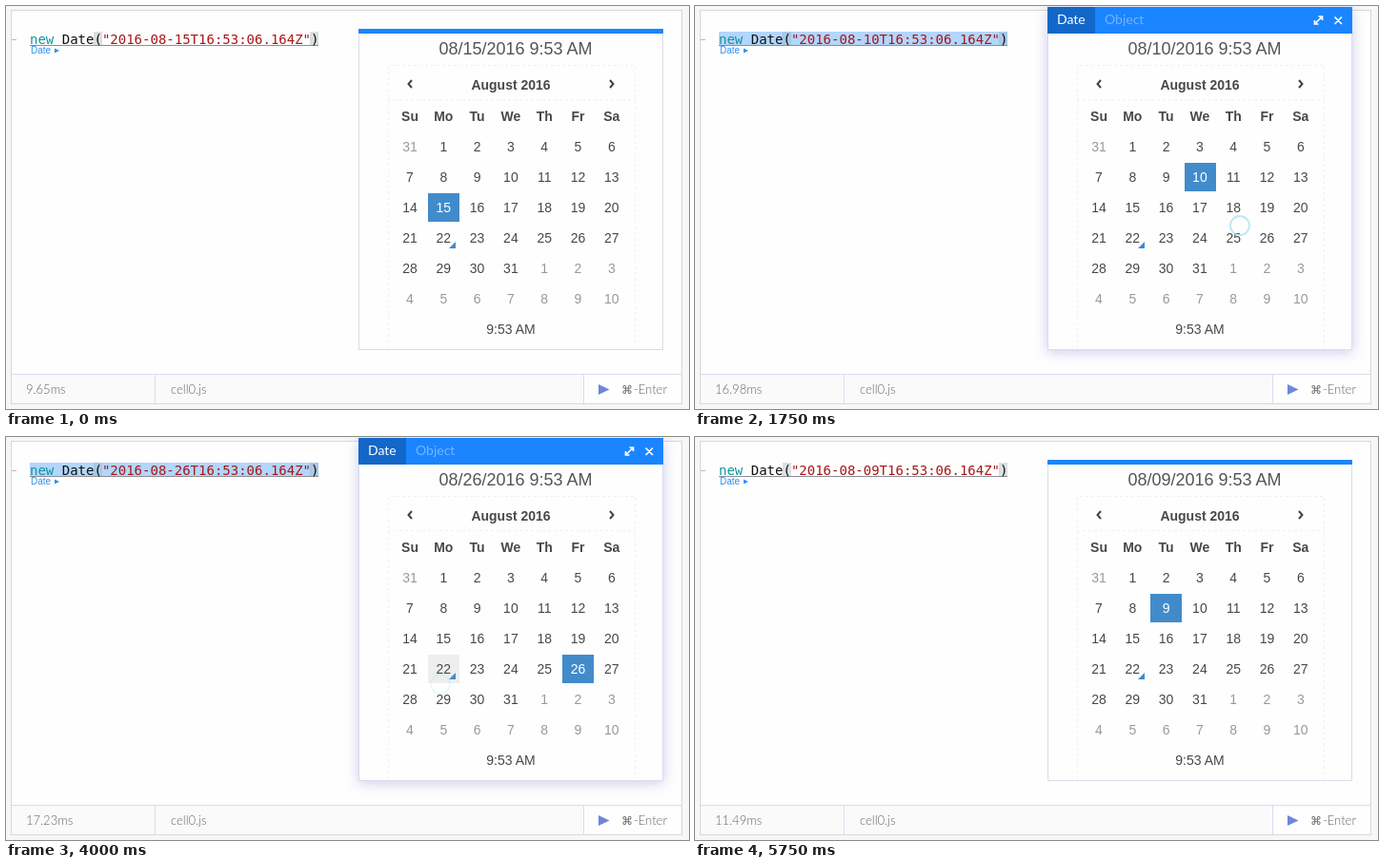
Recreate the animation shown at these times as an HTML page. Size 717 by 424 pixels, loop 7500 ms.

```html
<!DOCTYPE html>
<html lang="en">
<head>
<meta charset="utf-8">
<title>Date picker cell</title>
<style>
  html, body { margin: 0; width: 100%; height: 100%; overflow: hidden; background: #f7f7f7; }
  svg { display: block; width: 717px; height: 424px; }
  text { white-space: pre; }
  .code { font: 14px "DejaVu Sans Mono", monospace; fill: #111; }
  .word { fill: #12939c; }
  .string { fill: #a81717; }
  .cal { font: 14px "Liberation Sans", Arial, sans-serif; fill: #484848; text-anchor: middle; }
  .bold { font-weight: bold; }
  .title { font-size: 18px; fill: #555; }
  .other { fill: #999; }
  .picked { fill: #fff; }
  .type { font: 10px "Liberation Sans", Arial, sans-serif; fill: #3090ee; }
  .foot { font: 300 13px Lato, sans-serif; fill: #666; }
  .tab { font: 14px Lato, sans-serif; fill: #fff; }
  .line { fill: none; stroke: #fff; stroke-width: 1.7; }
  #panel { fill: #fefefe; stroke: #d9dcea; }
</style>
</head>
<body>
<svg viewBox="0 0 717 424">
  <!-- cell and footer -->
  <rect width="717" height="424" fill="#f7f7f7"/>
  <rect x="5.5" y="4.5" width="704" height="414" fill="#fefefe" stroke="#d8d8d8"/>
  <rect x="6" y="388" width="600" height="30" fill="#fafafb"/>
  <path d="M6 387.5H709M156.5 388V418M606.5 388V418" stroke="#dadcee"/>
  <path d="M6 35.5H11" stroke="#bbb"/>
  <text class="foot" id="time" x="21" y="408"></text>
  <text class="foot" x="173" y="408">cell0.js</text>
  <path d="M622 398L633.500 403.500L622 409Z" fill="#6f86dd"/>
  <text class="foot" x="646" y="408" style="font-family:'DejaVu Sans',sans-serif;font-size:12px">⌘</text>
  <text class="foot" x="694" y="408" text-anchor="end">-Enter</text>

  <!-- code -->
  <rect id="selection" x="25" y="27" width="303" height="15" fill="#b3d6fc"/>
  <path id="brackets" d="M92 27h9v15h-9zM319 27h9v15h-9z" fill="#dcdfe0"/>
  <path d="M25 41.500H328" stroke="#8a8f94"/>
  <text class="code" x="25" y="40"><tspan class="word">new</tspan> Date(<tspan class="string" id="stamp"></tspan>)</text>
  <text class="type" x="26" y="50">Date</text>
  <path d="M51 44.500L56 47L51 49.500Z" fill="#3090ee"/>

  <!-- date panel -->
  <g id="shadow"><rect id="caster" x="370" width="320" fill="#fff"/></g>
  <rect id="panel" x="370.500" y="24.500" width="319" height="337"/>
  <rect id="bar" x="370" width="320" fill="#1a85ff"/>
  <g id="tabs">
    <rect x="370" y="1" width="50" height="28" fill="#1267c8"/>
    <text class="tab" x="380" y="19">Date</text>
    <text class="tab" x="430" y="19" style="fill:#73b5ff">Object</text>
    <path class="line" d="M651 18.500L658 11.500M654.500 11H658.500V15M650.500 15V19H654.500M671.500 11.500L679 19M679 11.500L671.500 19"/>
  </g>
  <path d="M401.500 360V62.500H660.500V360M401 98.500H660" fill="none" stroke="#f0f0f0" stroke-dasharray="3 3"/>
  <text class="cal title" id="title" x="535" y="51"></text>
  <path d="M426 78L422.500 82L426 86M634 78L637.500 82L634 86" fill="none" stroke="#444" stroke-width="2"/>
  <text class="cal bold" x="530" y="88">August 2016</text>
  <rect id="hover" width="33" height="30" fill="#eee"/>
  <rect id="mark" width="33" height="30" fill="#428bca"/>
  <g id="grid"></g>
  <path id="today" d="M472 248V255H465Z"/>
  <text class="cal" x="530" y="345">9:53 AM</text>
  <circle id="pointer" fill="none" stroke="#a9e2f2" stroke-width="1.800"/>
</svg>
<script>
const $ = id => document.getElementById(id);
const STEP = 250, LOOP = 7500, TODAY = 22;
const colX = i => 424 + (i % 7) * 35.3;
const rowY = i => 148 + Math.floor(i / 7) * 32;

function addText(label, x, y, kind) {
  const t = document.createElementNS("http://www.w3.org/2000/svg", "text");
  t.setAttribute("class", "cal " + kind);
  t.setAttribute("x", x);
  t.setAttribute("y", y);
  t.textContent = label;
  $("grid").append(t);
  return t;
}

function set(id, attrs) {
  for (const k in attrs) $(id).setAttribute(k, attrs[k]);
}

const show = (id, on) => set(id, { visibility: on ? "visible" : "hidden" });

"Su Mo Tu We Th Fr Sa".split(" ").forEach((d, i) => addText(d, colX(i), 121, "bold"));

// The first cell is July 31, so a day of August is also its cell index.
const cells = Array.from({ length: 42 }, (_, i) =>
  addText((i + 30) % 31 + 1, colX(i), rowY(i) + 5, i < 1 || i > 31 ? "other" : ""));

// from step, day, run time
const picks = [[0, 15, "9.65"], [7, 10, "16.98"], [12, 26, "17.23"], [17, 22, "11.86"], [20, 9, "11.49"]];

// step: x, y, radius, opacity
const pointer = {
  1: [492, 86, 7, .6], 2: [544, 169, 7, .8], 3: [538, 190, 10, .75],
  4: [533, 209, 10, .6], 5: [533, 209, 10, .25], 7: [572, 231, 10, .8],
  8: [603, 252, 10, .6], 9: [603, 252, 10, .85], 10: [600, 271, 10, .6],
  12: [563, 270, 10, .7], 13: [471, 256, 10, .6], 14: [471, 256, 10, .85],
  15: [459.5, 260, 10, .6], 16: [456, 260, 10, .25], 17: [456, 260, 10, .6],
  18: [476, 221, 10, .7], 19: [477, 209, 10, .8], 20: [477, 209, 10, .6],
  21: [477, 205, 10, .75]
};

function placeCell(id, day) {
  set(id, { x: Math.round(colX(day) - 16.4), y: rowY(day) - 15 });
}

function draw(step) {
  const [, day, ms] = picks.filter(p => p[0] <= step).pop();
  const dd = String(day).padStart(2, "0");
  $("stamp").textContent = `"2016-08-${dd}T16:53:06.164Z"`;
  $("title").textContent = `08/${dd}/2016 9:53 AM`;
  $("time").textContent = ms + "ms";
  cells.forEach((c, i) => c.classList.toggle("picked", i === day));
  placeCell("mark", day);
  set("today", { fill: day === TODAY ? "#fff" : "#428bca" });
  show("hover", step === 15 || step === 16);

  const active = step >= 4 && step < 22;
  const top = active ? 1 : step === 22 ? 22 : 24;
  const depth = active ? (step === 4 ? .5 : 1) : step === 22 ? .5 : 0;
  show("selection", active);
  show("tabs", active);
  set("brackets", { fill: active ? "#a9c8e6" : "#dcdfe0" });
  set("bar", { y: top, height: 29 - top });
  set("caster", { y: top, height: 362 - top });
  $("shadow").style.filter = depth
    ? `drop-shadow(0 2px ${7 * depth}px rgba(80,85,190,${.3 * depth}))` : "none";

  const p = pointer[step];
  show("pointer", p);
  if (p) set("pointer", { cx: p[0], cy: p[1], r: p[2], opacity: p[3] });
}

placeCell("hover", TODAY);
let last = -1;
function tick() {
  const step = Math.floor(performance.now() % LOOP / STEP);
  if (step !== last) draw(last = step);
  requestAnimationFrame(tick);
}
tick();
</script>
</body>
</html>
```
